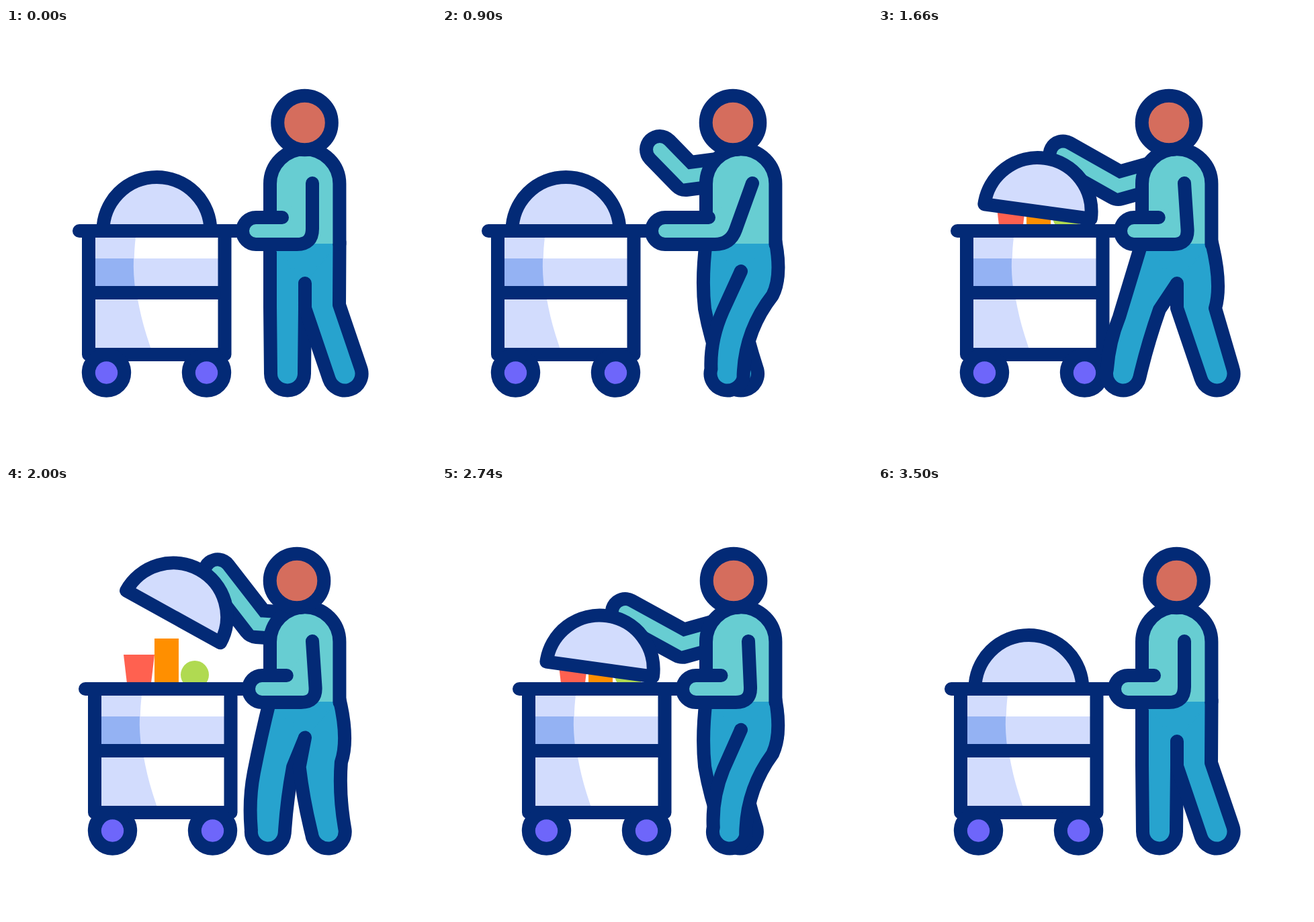
Animation, 640 px wide and 640 px high, one loop 3600 ms. Source, as an HTML page:

```html
<!DOCTYPE html>
<html lang="en">
<head>
<meta charset="utf-8">
<title>Serving cart</title>
<style>
  html, body { margin: 0; width: 100%; height: 100%; overflow: hidden; background: #fff; }
  svg { display: block; width: 100vw; height: 100vh; }
  .line { stroke: #032a76; stroke-width: 20; stroke-linecap: round; stroke-linejoin: round; fill: none; }
  .teal { fill: #67cdd2; }
  .blue { fill: #27a3ce; }
  .pale { fill: #d2dcfd; }
  .wheel { fill: #6e66fa; }
  .skin { fill: #d56d5d; }
  .limb { fill: none; stroke-linecap: round; }
</style>
</head>
<body>
<svg viewBox="0 0 640 640">
  <path id="armEdge" class="limb" stroke="#032a76" stroke-width="60" stroke-linejoin="round"/>
  <path id="armFill" class="limb" stroke="#67cdd2" stroke-width="20"/>

  <g id="cart">
    <path fill="#ff6150" d="M166 251H212L206 302H172Z"/>
    <path fill="#ff8f00" d="M212 227H248V302H212Z"/>
    <circle fill="#b0da51" cx="272" cy="281" r="21"/>
    <path fill="#fff" d="M123 302H326V486H123Z"/>
    <path class="pale" d="M123 343H326V394H123Z"/>
    <path class="pale" d="M123 302H194.500C187 345 189 405 219 486H123Z"/>
    <path fill="#94b2f3" d="M123 343H190Q189 366 193 394H123Z"/>
    <path id="dome" class="line pale" d="M-80 0A80 80 0 0 1 80 0Z"/>
    <path class="line" d="M109 302H352M123 302V486H325.500V302M123 394H325.500"/>
    <circle class="line wheel" cx="149.500" cy="513" r="26.700"/>
    <circle class="line wheel" cx="298.500" cy="513" r="26.700"/>
  </g>

  <path id="farLeg" class="line blue"/>
  <path id="pelvis" class="blue" stroke="#27a3ce" stroke-width="4"/>
  <path id="nearLeg" class="line blue"/>
  <path class="teal" d="M393 321V232A51.700 51.700 0 0 1 496.400 232V321Z"/>
  <path class="line" d="M393 322V232A51.700 51.700 0 0 1 496.400 232V322"/>
  <circle id="head" class="line skin" cx="444.500" cy="141" r="40.300"/>
  <path id="nearArm" class="line teal"/>
</svg>

<script>
const LOOP = 3600;
const HIP_Y = 318, FOOT_Y = 514.5, FOOT_R = 25;
const $ = id => document.getElementById(id);
const setPath = (id, d) => $(id).setAttribute('d', d);
const move = (id, value) => $(id).setAttribute('transform', value);
const mix = (a, b, k) => a + (b - a) * k;
const blend = (a, b, k) => a.map((v, i) => mix(v, b[i], k));

// eased progress from time a to time b
function ease(t, a, b) {
  const u = Math.min(1, Math.max(0, (t - a) / (b - a)));
  return (1 - Math.cos(Math.PI * u)) / 2;
}

// outline of one leg; side is 1 when its outer edge is on the right
function legPath({ side, hip, knee, fold, foot, crotch, thigh, shin }) {
  const top = [hip, HIP_Y];
  const mid = blend(knee, fold, 0.5);
  const dx = foot - mid[0], dy = FOOT_Y - mid[1];
  const k = side * FOOT_R / Math.hypot(dx, dy);
  const outer = [foot + dy * k, FOOT_Y - dx * k];
  const inner = [foot - dy * k, FOOT_Y + dx * k];
  const bend = (a, b, x, y) => [(a[0] + b[0]) / 2 + x, (a[1] + b[1]) / 2 + y];
  return `M${top}Q${bend(top, knee, side * thigh, thigh)} ${knee}` +
    `Q${bend(knee, outer, -shin, -shin / 3)} ${outer}` +
    `A${FOOT_R} ${FOOT_R} 0 0 ${side > 0 ? 1 : 0} ${inner}` +
    `Q${bend(inner, fold, -shin / 2, 0)} ${fold}L${crotch}`;
}

function drawLegs(t) {
  const gather = ease(t, 0, 660) - ease(t, 2650, 3330);
  const stride = ease(t, 900, 1660) - ease(t, 1700, 2500);
  const together = gather - stride;
  const crotch = [445, 380 - 18 * together];

  setPath('nearLeg', legPath({
    side: 1, hip: 496.5, crotch,
    knee: [496 - 4 * together + 6 * stride, 412 - 14 * together + 5 * stride],
    fold: [445 - 27 * together, 417 + 4 * together],
    foot: 504.5 - 80 * together,
    thigh: 12 * together + 13 * stride,
    shin: 21 * together
  }));
  setPath('farLeg', legPath({
    side: -1, hip: 393, crotch,
    knee: [393 - 2 * gather - 32 * stride, 415 + 3 * gather + 12 * stride],
    fold: [445 - 26 * stride, 417 + 2 * stride],
    foot: 419 + 26 * gather - 80 * stride,
    thigh: 6 * together,
    shin: 6 * gather
  }));
  setPath('pelvis', `M393 ${HIP_Y}H496L${crotch}Z`);
}

function drawNearArm(dx) {
  const shoulder = [456 + 0.15 * Math.max(0, -dx), 231];
  const elbow = [456 + 0.67 * dx, 322];
  const bend = 23 / Math.hypot(shoulder[0] - elbow[0], shoulder[1] - elbow[1]);
  const hand = 372 + dx;
  const tip = 411 + dx * (dx < 0 ? 0.35 : 0.75);
  setPath('nearArm',
    `M${shoulder}L${blend(elbow, shoulder, bend)}Q${elbow} ${elbow[0] - 23} 322` +
    `H${hand}A20 20 0 0 1 ${hand} 282H${tip}`);
}

function drawFarArm(t, grip, lift) {
  const restHand = [414, 283], restElbow = [420, 285];
  const rise = ease(t, 0, 610), reach = ease(t, 1000, 1460), drop = ease(t, 2900, 3330);
  const raisedHand = [mix(restHand[0], 324, ease(t, 0, 360)), mix(restHand[1], 181, rise)];
  const raisedElbow = [mix(restElbow[0], 363, ease(t, 0, 460)), mix(restElbow[1], 221, rise)];
  const gripElbow = [352 + 22 * lift, 246 - 42 * lift];
  const hand = blend(blend(raisedHand, grip, reach), restHand, drop);
  const elbow = blend(blend(raisedElbow, gripElbow, reach), restElbow, drop);
  const d = `M${hand}L${elbow}L447 210`;
  setPath('armEdge', d);
  setPath('armFill', d);
}

function draw(t) {
  const dx = -40 * ease(t, 0, 540) + 49 * ease(t, 1000, 1620) - 9 * ease(t, 2330, 3380);
  move('cart', `translate(${dx} 0)`);

  const lift = ease(t, 1453, 2060) - ease(t, 2440, 2900);
  const x = 224.4 + 16 * lift, y = 302 - 110 * lift, tilt = 29.7 * lift;
  move('dome', `translate(${x} ${y}) rotate(${tilt})`);

  // the hand holds a fixed spot on the lid
  const a = tilt * Math.PI / 180, c = Math.cos(a), s = Math.sin(a);
  drawFarArm(t, [x + dx + 26 * c + 89 * s, y + 26 * s - 89 * c], lift);

  drawLegs(t);
  drawNearArm(dx);
  move('head', `translate(${-11.5 * (ease(t, 0, 760) - ease(t, 2600, 3330))} 0)`);
}

const start = performance.now();
function tick() {
  draw((performance.now() - start) % LOOP);
  requestAnimationFrame(tick);
}
tick();
</script>
</body>
</html>
```
